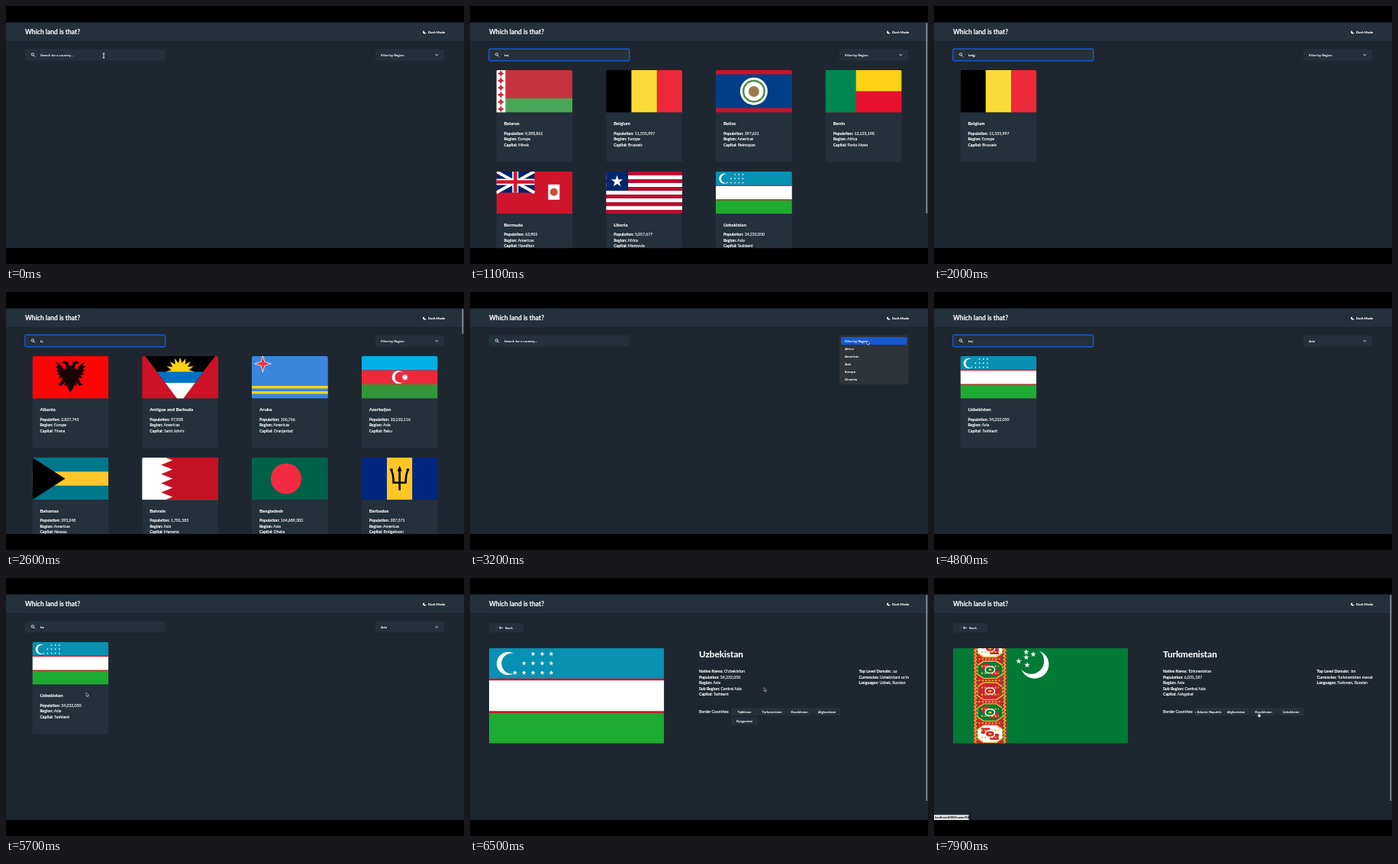
Animation of 600 by 338 pixels, one loop 8000 ms. Source, as an HTML page:

```html
<!DOCTYPE html>
<html lang="en">
<head>
<meta charset="utf-8">
<style>
  html, body { margin: 0; width: 100%; height: 100%; overflow: hidden; background: #000; }
  svg { display: block; }
  text { font-family: Lato, sans-serif; fill: #fff; stroke: #fff; stroke-width: .13px; white-space: pre; }
  .dark { fill: #111; stroke: #111; }
  .arabic { font-family: "DejaVu Sans", sans-serif; font-weight: 700; text-anchor: middle; }
</style>
</head>
<body>
<svg width="600" height="338" viewBox="0 0 600 338">
  <defs><clipPath id="round"><rect width="100" height="70" rx="2.5"/></clipPath></defs>
  <g id="page"></g>
  <g id="pointer"></g>
</svg>
<script>
const BG = '#1e2730', PANEL = '#24303a', LOOP = 8000;
const FW = 100, FH = 55.5; // flag units

// Shape helpers
const rect = (x, y, w, h, fill, more = '') => `<rect x="${x}" y="${y}" width="${w}" height="${h}" fill="${fill}" ${more}/>`;
const disc = (x, y, r, fill) => `<circle cx="${x}" cy="${y}" r="${r}" fill="${fill}"/>`;
const poly = (points, fill) => `<polygon points="${points}" fill="${fill}"/>`;
const line = (d, stroke, width = 1, more = '') => `<path d="${d}" fill="none" stroke="${stroke}" stroke-width="${width}" ${more}/>`;
const text = (x, y, size, str, more = '') => `<text x="${x}" y="${y}" font-size="${size}" ${more}>${str}</text>`;
const bold = 'font-weight="700"';
const bands = (...colors) => colors.map((c, i) => rect(0, i * FH / colors.length, FW, FH / colors.length + .1, c)).join('');
const pales = (...colors) => colors.map((c, i) => rect(i * FW / colors.length, 0, FW / colors.length + .1, FH, c)).join('');
const repeat = (n, fn) => Array.from({ length: n }, (_, i) => fn(i)).join('');
function star(x, y, r, fill, n = 5, inner = .4) {
  const points = Array.from({ length: n * 2 }, (_, i) => {
    const a = Math.PI * (i / n - .5), d = i % 2 ? r * inner : r;
    return (x + d * Math.cos(a)).toFixed(2) + ',' + (y + d * Math.sin(a)).toFixed(2);
  });
  return poly(points.join(' '), fill);
}
const mirror = shape => shape + `<g transform="matrix(-1 0 0 1 100 0)">${shape}</g>`;

const red = '#c8282d', gold = '#f0b93a', green = '#007a35';

function carpet() {
  const cx = 21.1;
  const oct = (y, w, h, fill) => poly([[-w, -h / 2], [-w / 2, -h], [w / 2, -h], [w, -h / 2], [w, h / 2], [w / 2, h], [-w / 2, h], [-w, h / 2]]
    .map(([dx, dy]) => `${cx + dx},${y + dy}`).join(' '), fill);
  const guls = repeat(5, i => {
    const y = .7 + i * 12.2, tint = ['#fff', green, red][i % 4 === 0 ? 0 : 1 + (i + 1) % 2];
    return oct(y, 7.6, 5.2, gold) + oct(y, 6.9, 4.6, tint) +
      rect(cx - 5, y - 3.4, 5, 3.4, red) + rect(cx, y, 5, 3.4, red) +
      line(`M${cx - 5} ${y - 2}h10M${cx - 5} ${y + 2}h10`, gold, .8, 'stroke-dasharray="1 .9"') +
      oct(y, 2.9, 2, '#fff') + oct(y, 2.3, 1.5, i % 2 ? green : red) + oct(y, .9, .6, gold) +
      line(`M14.5 ${y + 6.1}h13.2`, gold, .7, 'stroke-dasharray="1 .9"');
  });
  const steps = repeat(28, i => `M12 ${i * 2}l1.6 1l-1.6 1M30.2 ${i * 2}l-1.6 1l1.6 1`);
  return rect(11.8, 0, 18.7, FH, red) + guls + line(steps, gold, .6) +
    line('M13.7 0v56M28.5 0v56', green, .6, 'stroke-dasharray="1.1 .9"');
}

const zigzag = Array.from({ length: 11 }, (_, i) => `${i % 2 ? 40 : 25},${i * 6 - 2.25}`).join(' ');
const azeri = '#ed2939', aqua = '#00778b';

const flags = {
  Afghanistan: bands('#fff') + text(50, 27, 21, 'لا إله إلا الله', 'class="dark arabic"') + text(50, 43, 19, 'محمد رسول الله', 'class="dark arabic"'),
  Albania: bands('#fb0606') + mirror(poly('50.5,12 48,13 47,8 43,6 38,9 43,10 45,16 41,17 38,12 31,7 34,13 30,13 34,17 31,19 35,21 32,24 37,25 34,29 40,28 36,36 33,37 38,39 43,34 42,39 45,38 47,43 50.5,48', '#1a0505')),
  'Antigua and Barbuda': bands('#ce1126') + poly('0,-5.6 100,-5.6 50,61.1', '#000') + star(50, 20.5, 19, '#fcd116', 16, .62) +
    poly('19.6,20.5 80.4,20.5 69.6,35 30.4,35', '#0072c6') + poly('30.4,35 69.6,35 50,61.1', '#fff'),
  Armenia: bands('#d90012', '#0033a0', '#f2a800'),
  Aruba: bands('#3b86dd') + rect(0, 39, FW, 3.4, '#f9d616') + rect(0, 46, FW, 3.4, '#f9d616') +
    star(14.5, 10, 12, '#fff', 4, .32) + star(14.5, 10, 9.6, '#ef3340', 4, .32),
  Azerbaijan: bands('#00b0e6', azeri, '#339638') + disc(48.5, 27.7, 8.6, '#fff') + disc(51, 27.7, 7.2, azeri) + star(57, 27.7, 4.8, '#fff', 8, .5),
  Bahamas: bands(aqua, '#ffc72c', aqua) + poly('0,0 43,27.7 0,55.5', '#000'),
  Bahrain: bands('#fff') + poly(zigzag + ' 100,57.75 100,-2.25', '#c41222'),
  Bangladesh: bands('#006148') + disc(45, 27.7, 20, '#f42a41'),
  Barbados: pales('#00267f', '#ffc726', '#00267f') + line('M50 14v29M41 16q-2 0 -3 -1q4 5 4 18h16q0 -13 4 -18q-1 1 -3 1', '#000', 2.6) + poly('50,11 53,18 47,18', '#000'),
  Belarus: rect(0, 0, FW, 37, '#c8313e') + rect(0, 37, FW, 18.5, '#4aa657') + rect(0, 0, 12, FH, '#fff') +
    repeat(6, i => star(6, 4.5 + i * 9.3, 4.5, '#c8313e', 4, .5)),
  Belgium: pales('#000', '#fadb38', '#ed2939'),
  Belize: bands('#003f87') + rect(0, 0, FW, 5.5, '#ce1126') + rect(0, 50, FW, 5.5, '#ce1126') +
    disc(50, 27.7, 18, '#fff') + disc(50, 27.7, 15, '#4d8f4a') + disc(50, 27.7, 12.5, '#fff') + disc(50, 28, 7, '#9c7a4f'),
  Benin: bands('#fcd116', '#e8112d') + rect(0, 0, 40, FH, '#008751'),
  Bermuda: bands('#cf142b') + rect(0, 0, 50, 27.7, '#012169') + line('M0 0L50 27.7M50 0L0 27.7', '#fff', 4) +
    line('M25 0v27.7M0 13.8h50', '#fff', 8) + line('M25 0v27.7M0 13.8h50', '#cf142b', 4.5) + rect(68, 17, 15, 20, '#fff') + disc(75.5, 27, 5, '#c8503c'),
  Bhutan: bands('#ffd520') + poly('0,61.1 100,-5.6 100,61.1', '#ff4e12') +
    line('M19 47q1 -9 9 -8t12 -1t9 -9t10 -7t11 -4t6 -10M28 40l-6 -5M39 38l4 8l6 1M45 33l-8 -7M59 23l-4 -10l4 -3M64 21l9 9l6 -1M76 9l6 6', '#fff', 5, 'stroke-linejoin="round"') +
    line('M21 44q8 -7 16 -5t12 -9t18 -10t8 -9M42 43l5 3M68 25l6 4', '#8c8371', .8, 'stroke-dasharray="1.5 1"'),
  'Brunei Darussalam': bands('#f7de10') + poly('0,7.2 100,25.2 100,36.8 0,18.7', '#fff') + poly('0,18.7 100,36.8 100,48.4 0,30.3', '#000') +
    line('M35 25q1 18 15 18t15 -18M50 10v32M44 17h12M41 24q9 8 18 0M35 45q15 5 30 0', '#cf1126', 3) + disc(50, 15, 3.5, '#cf1126') + line('M39 36q11 7 22 0', '#f7e017', 1),
  Cambodia: bands('#032ea1') + rect(0, 11.75, FW, 32, '#e00025') +
    mirror(poly('50.2,17 48,20 47,26 44,26 43,22 40,26 39,32 36,32 35,28 33,31 33,36 30,37 30,41 50.2,41', '#fff')) +
    line('M31 37.5h38M36 33h28M43 27h14M40 33v8M45 28v13M50 22v19M55 28v13M60 33v8', '#777', .6),
  Lebanon: rect(0, 0, FW, FH, '#fff') + rect(0, 0, FW, 14, '#ed1c24') + rect(0, 41.5, FW, 14, '#ed1c24') +
    mirror(poly('50.2,15 44,22 47,23 39,28 45,29 36,35 48,35 47,40 50.2,40', '#00a651')),
  Liberia: repeat(11, i => rect(0, i * FH / 11, FW, 5.2, i % 2 ? '#fff' : '#bf0a30')) + rect(0, 0, 29, 25.2, '#002868') + star(14.5, 13, 8, '#fff'),
  Turkmenistan: bands(green) + carpet() + disc(46.6, 9.8, 8.1, '#fff') + disc(44.6, 7.9, 7.4, green) +
    [[41.8, 2.8], [45.8, 4.1], [37.5, 8], [41.8, 5.8], [42.3, 10.2]].map(([x, y]) => star(x, y, 1.7, '#fff')).join(''),
  Uzbekistan: bands('#0891b2', '#fff', '#1eab32') + rect(0, 17.9, FW, 1.1, '#ce1126') + rect(0, 36.5, FW, 1.1, '#ce1126') +
    disc(10.9, 9.35, 6.55, '#fff') + disc(13, 9.35, 5.9, '#0891b2') +
    repeat(3, r => repeat(3 + r, i => star(35.5 - i * 5.18, 3.9 + r * 5.35, 1.4, '#fff')))
};

// Population, region, capital
const facts = {
  Afghanistan: '40,218,234|Asia|Kabul', Albania: '2,837,743|Europe|Tirana',
  'Antigua and Barbuda': "97,928|Americas|Saint John's", Armenia: '2,963,234|Asia|Yerevan',
  Aruba: '106,766|Americas|Oranjestad', Azerbaijan: '10,110,116|Asia|Baku',
  Bahamas: '393,248|Americas|Nassau', Bahrain: '1,701,583|Asia|Manama',
  Bangladesh: '164,689,383|Asia|Dhaka', Barbados: '287,371|Americas|Bridgetown',
  Belarus: '9,398,861|Europe|Minsk', Belgium: '11,555,997|Europe|Brussels',
  Belize: '397,621|Americas|Belmopan', Benin: '12,123,198|Africa|Porto-Novo',
  Bermuda: '63,903|Americas|Hamilton', Bhutan: '771,612|Asia|Thimphu',
  'Brunei Darussalam': '437,483|Asia|Bandar Seri Begawan', Cambodia: '16,718,971|Asia|Phnom Penh',
  Lebanon: '6,825,442|Asia|Beirut', Liberia: '5,057,677|Africa|Monrovia',
  Uzbekistan: '34,232,050|Asia|Tashkent'
};

const lists = {
  b: 'Albania,Antigua and Barbuda,Aruba,Azerbaijan,Bahamas,Bahrain,Bangladesh,Barbados',
  be: 'Belarus,Belgium,Belize,Benin,Bermuda,Liberia,Uzbekistan',
  bel: 'Belarus,Belgium,Belize', belg: 'Belgium',
  Asia: 'Afghanistan,Armenia,Azerbaijan,Bahrain,Bangladesh,Bhutan,Brunei Darussalam,Cambodia',
  Asiab: 'Azerbaijan,Bahrain,Bangladesh,Bhutan,Brunei Darussalam,Cambodia,Lebanon,Uzbekistan',
  Asiabe: 'Uzbekistan'
};
const thumbs = { b: 33, be: 250, Asia: 46, Asiab: 150 };

const details = {
  Uzbekistan: {
    x: 509.5, left: "Native Name: O'zbekiston|Population: 34,232,050|Region: Asia|Sub Region: Central Asia|Capital: Tashkent",
    right: "Top Level Domain: .uz|Currencies: Uzbekistani so'm|Languages: Uzbek, Russian",
    borders: ['Tajikistan', 'Turkmenistan', 'Kazakhstan', 'Afghanistan', 'Kyrgyzstan']
  },
  Turkmenistan: {
    x: 501.5, left: 'Native Name: Türkmenistan|Population: 6,031,187|Region: Asia|Sub Region: Central Asia|Capital: Ashgabat',
    right: 'Top Level Domain: .tm|Currencies: Turkmenistan manat|Languages: Turkmen, Russian',
    borders: ['Iran (Islamic Republic of)', 'Afghanistan', 'Kazakhstan', 'Uzbekistan']
  }
};

const flag = (name, x, y, w, h, more = '') =>
  `<svg x="${x}" y="${y}" width="${w}" height="${h}" viewBox="0 0 100 55.5" preserveAspectRatio="xMidYMid slice"><g ${more}>${flags[name]}</g></svg>`;
const fields = (x, y, rows) => rows.map((row, i) => {
  const [label, value] = row.split(': ');
  return text(x, y + i * 7.52, 5.2, `<tspan ${bold}>${label}:</tspan> ${value}`);
}).join('');
const scrollbar = h => h ? rect(597.3, 22, 2, h, '#7d848a', 'rx="1"') : '';

function card(name, i) {
  const x = 34.4 + i % 4 * 143.75, y = 84 + Math.floor(i / 4) * 132.8;
  const [pop, region, capital] = facts[name].split('|');
  return rect(x, y, 100, 120.5, PANEL, 'rx="2.5"') + flag(name, x, y, 100, 55.5, 'clip-path="url(#round)"') +
    text(x + 10, y + 71.8, 6.1, name, bold) +
    fields(x + 10, y + 84.6, ['Population: ' + pop, 'Region: ' + region, 'Capital: ' + capital]);
}

function listPage({ query, focus, region, menu }) {
  const key = region + query;
  const typed = query ? query + (focus ? '<tspan font-weight="300">|</tspan>' : '') : 'Search for a country...';
  let out = rect(25, 56.5, 183.5, 15, PANEL, 'rx="1.5"') +
    line('M37.9 66.4l-2 -2', '#fff', .9) + `<circle cx="34.9" cy="63.4" r="1.6" fill="none" stroke="#fff" stroke-width=".8"/>` +
    text(45, 65.7, 4.5, typed) + rect(484, 56.5, 90.5, 15, PANEL, 'rx="1.5"') +
    text(491, 65.7, 4.5, region || 'Filter by Region') + line('M562.7 63.3l1.6 1.6l1.6 -1.6', '#fff', .9);
  if (focus) out += rect(24.8, 56.3, 184, 15.4, 'none', 'rx="2" stroke="#1559cf" stroke-width="1.4"');
  if (lists[key]) out += lists[key].split(',').map(card).join('');
  out += scrollbar(thumbs[key]);
  if (menu) {
    const names = ['Filter by Region', 'Africa', 'Americas', 'Asia', 'Europe', 'Oceania'];
    out += rect(484, 57, 90.5, 64, '#2f3439', 'rx="3"') + rect(486, 59 + menu.row * 10, 86.5, 10, '#1559cf', 'rx="2"') +
      names.map((n, i) => text(491, 65.7 + i * 10, 4.5, n)).join('');
  }
  return out;
}

function detailPage(name, url) {
  const d = details[name];
  const buttons = d.borders.map((b, i) => {
    const x = 342 + i % 4 * 36, y = 170 + Math.floor(i / 4) * 12.6;
    return `<svg x="${x}" y="${y}" width="35.3" height="10.2">${rect(0, 0, 35.3, 10.2, PANEL, 'rx="1"')}${text(17.6, 6.7, 4.45, b, 'text-anchor="middle"')}</svg>`;
  }).join('');
  return rect(25, 59, 45.5, 12.5, PANEL, 'rx="1.5"') + line('M43 65.3h-4.6m1.8 -1.8l-1.8 1.8l1.8 1.8', '#fff', .8) +
    text(46, 67.1, 4.6, 'Back') + flag(name, 25, 92, 229.3, 124.5) +
    text(300, 104.3, 11.7, name, bold) + fields(300, 124.4, d.left.split('|')) + fields(d.x, 124.4, d.right.split('|')) +
    text(300, 176.8, 5.1, 'Border Countries:') + buttons + scrollbar(270) +
    (url ? rect(0, 310.3, 45.5, 7, '#e6e8ea') + text(1, 315, 4.1, 'localhost:8080/name/' + url, 'class="dark"') : '');
}

// Value of the last step reached: [time, value]
const at = (steps, t) => steps.reduce((v, [s, next]) => t >= s ? next : v, steps[0][1]);
const typing = [[0, ''], [800, 'b'], [1100, 'be'], [1300, 'bel'], [1500, 'belg'], [2300, 'bel'], [2400, 'be'], [2500, 'b'], [2800, ''], [4500, 'b'], [4700, 'be']];
const focusing = [[0, false], [500, true], [3100, false], [4300, true], [5700, false]];
const path = [[0, 128, 65], [300, 118, 66], [2900, 118, 66], [3150, 520, 64], [3350, 520, 64], [3550, 492.5, 93], [3900, 492.5, 93], [4250, 128, 65],
  [5100, 128, 65], [5700, 105, 150], [6100, 105, 150], [6500, 385, 143.5], [6800, 394, 175], [7200, 394, 175], [7650, 425.5, 176.5], [8000, 425.5, 176.5]];

function pointerAt(t) {
  const i = path.findIndex(p => p[0] > t), [t0, x0, y0] = path[i - 1], [t1, x1, y1] = path[i];
  const k = (t - t0) / (t1 - t0), e = k * k * (3 - 2 * k);
  return [x0 + (x1 - x0) * e, y0 + (y1 - y0) * e];
}

const shapes = {
  beam: line('M-1.3 -3h2.6M0 -3v6M-1.3 3h2.6', '#fff', .9),
  arrow: `<path d="M0 0v4.8l1.1 -1l.8 1.9l.9 -.4l-.8 -1.8h1.6z" fill="#000" stroke="#fff" stroke-width=".5"/>`,
  hand: `<path d="M-.5 0q.6 -.5 1 .2v1.8l2 .6v2l-.6 1.2h-2.3l-1.6 -2.4l.5 -.4l1 .6z" fill="#fff" stroke="#111" stroke-width=".4"/>`
};

const header = rect(0, 21.5, 600, 295.7, BG, 'rx="2"') + rect(0, 21.7, 600, 24.5, PANEL) + rect(0, 46.2, 600, .7, '#1a222a') +
  text(25, 36.9, 8.5, 'Which land is that?', bold) + text(553, 35.7, 4.4, 'Dark Mode', bold) +
  `<path d="M547.6 31.9a2.4 2.4 0 1 0 3.1 3.2a2.6 2.6 0 0 1 -3.1 -3.2z" fill="#fff"/>`;
const footer = rect(0, 317.2, 600, 21, '#000');
const page = document.getElementById('page'), pointer = document.getElementById('pointer');
let shown = '';

function frame(now) {
  const t = now % LOOP, [x, y] = pointerAt(t), inDetail = t >= 6000;
  let body, shape = 'arrow';
  if (inDetail) {
    const hover = y > 170 && x > 378;
    if (hover) shape = 'hand';
    const name = t < 7150 ? 'Uzbekistan' : 'Turkmenistan';
    const url = !hover ? '' : name === 'Uzbekistan' ? 'TKM' : x > 414 ? 'KAZ' : 'AFG';
    body = detailPage(name, url);
  } else {
    if (y > 56 && y < 72 && x > 25 && x < 209) shape = 'beam';
    const menu = t >= 3200 && t < 3600 && { row: Math.max(0, Math.min(3, Math.floor((y - 59) / 10))) };
    body = listPage({ query: at(typing, t), focus: at(focusing, t), region: t >= 3600 ? 'Asia' : '', menu });
  }
  if (body !== shown) page.innerHTML = header + (shown = body) + footer;
  const hidden = t > 700 && t < 2900 || t > 4450 && t < 5050;
  pointer.innerHTML = hidden ? '' : shapes[shape];
  pointer.setAttribute('transform', `translate(${x.toFixed(2)} ${y.toFixed(2)})`);
  requestAnimationFrame(frame);
}
requestAnimationFrame(frame);
</script>
</body>
</html>
```
